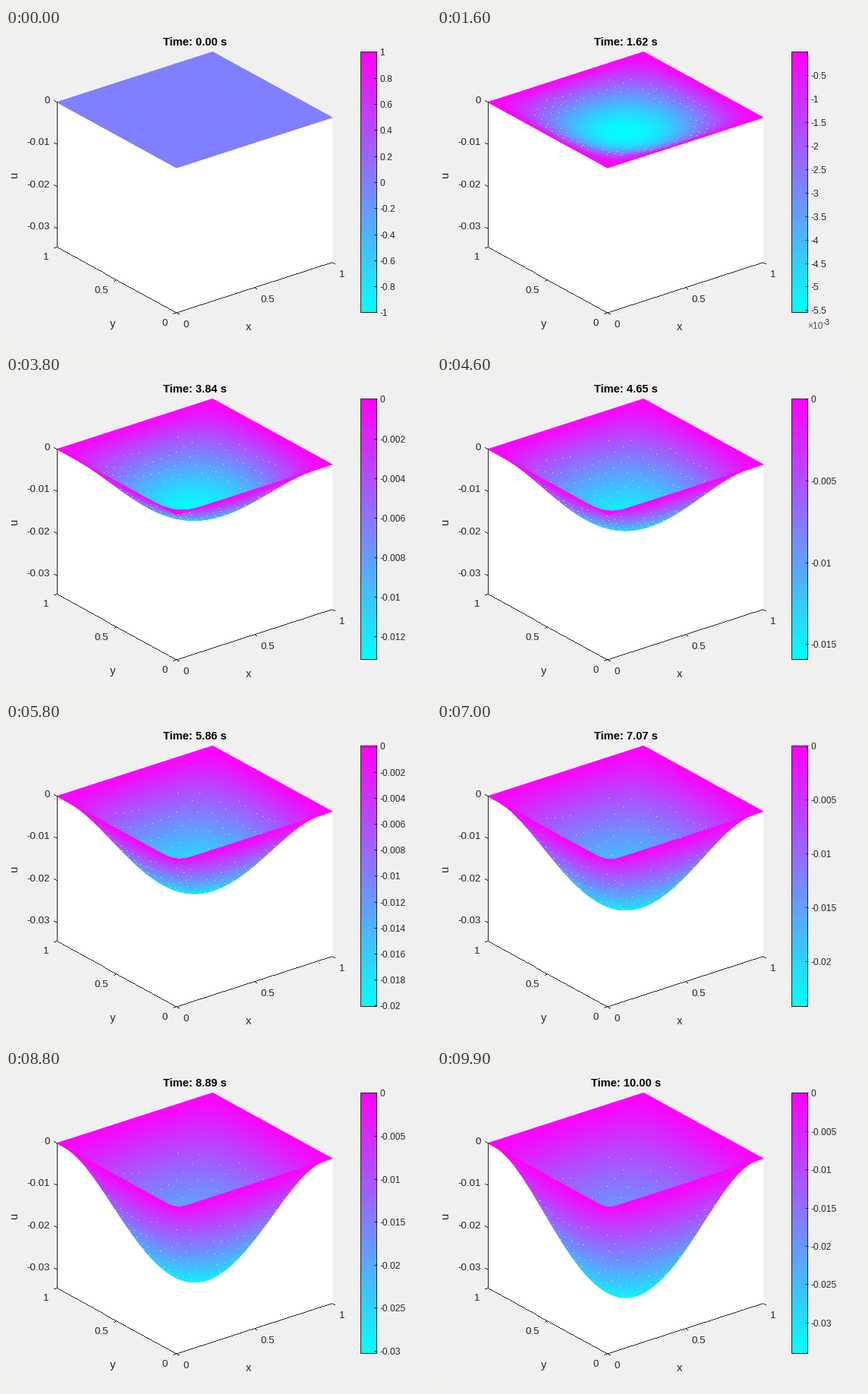
Write a matplotlib script that moves like this. It is 560 px wide and 420 px high and loops after 10 s.

```python
import numpy as np
import matplotlib.pyplot as plt
from matplotlib.animation import FuncAnimation
from matplotlib.patches import Polygon

W, H, DPI = 560, 420, 100
FRAMES, T_END = 100, 10.0
INK = "#262626"

plt.rcParams["font.family"] = "Liberation Sans"
fig = plt.figure(figsize=(W / DPI, H / DPI), dpi=DPI, facecolor="#f0f0f0")
ax = fig.add_axes([0, 0, 1, 1])
ax.set_xlim(-0.5, W - 0.5)
ax.set_ylim(H - 0.5, -0.5)
ax.axis("off")
ax.autoscale(False)

# Orthographic projection in pixels
ORIGIN = np.array([224.2, 183.5])
EX = np.array([205.0, -66.2])
EY = np.array([-157.5, -86.3])
DROP, Z_MIN = 191.0, 0.0344


def depth(t):
    """Largest deflection at time t."""
    return 0.003435 * t * (1 - 8.2e-5 * t * t)


def project(x, y, z=0.0):
    px = ORIGIN[0] + EX[0] * x + EY[0] * y
    py = ORIGIN[1] + EX[1] * x + EY[1] * y - DROP * z / Z_MIN
    return px, py


def text(x, y, s, px, **kw):
    opts = dict(ha="center", va="center_baseline", color=INK, zorder=6)
    opts.update(kw)
    return ax.text(x, y, s, fontsize=px * 72 / DPI, **opts)


# Hard-edged one-pixel lines live on a transparent layer
ink = np.zeros((H, W, 4), np.uint8)
ink[..., :3] = 0x26


def line(a, b):
    n = int(np.ceil(max(abs(b[0] - a[0]), abs(b[1] - a[1])))) + 1
    cols = np.rint(np.linspace(a[0], b[0], n)).astype(int)
    rows = np.rint(np.linspace(a[1], b[1], n)).astype(int)
    ink[rows, cols, 3] = 255


def tick(p, dx, dy):
    line(p, (p[0] + dx, p[1] + dy))


# Sagging membrane, fixed at its edges; far corner first for painter's order
N = 40
g = np.linspace(1, 0, N + 1)
X, Y = np.meshgrid(g, g)
shape = 16 * X * (1 - X) * Y * (1 - Y)

# Box and axes
box = [project(0, 1), project(1, 1), project(1, 0), project(1, 0, -Z_MIN),
       project(0, 0, -Z_MIN), project(0, 1, -Z_MIN)]
ax.add_patch(Polygon(box, fc="white", ec="none", antialiased=False, zorder=1))
for a, b in ((box[0], box[5]), (box[5], box[4]), (box[4], box[3])):
    line(a, b)

for k, v in enumerate((0, 0.5, 1)):
    tick(project(v, 0, -Z_MIN), 3.5, 2)
    tick(project(0, v, -Z_MIN), -3.8, 1.2)
    text(233 + 102.5 * k, 389.5 - 33 * k, f"{v:g}", 13.33, ha="left")
    text(212.7 - 78.2 * k, 387.5 - 43.5 * k, f"{v:g}", 13.33, ha="right")
for z in (0, -0.01, -0.02, -0.03):
    p = project(0, 1, z)
    tick(p, -3.5, -2)
    text(57, p[1] - 3.5, f"{z:g}", 13.33, ha="right")

text(319.3, 392.3, "x", 14.67)
text(140.3, 388.3, "y", 14.67)
text(11, 192, "u", 14.67, rotation=90, va="center")
title = text(248.7, 22.6, "", 14.67, weight="bold", color="black", va="baseline")

# Colour bar
L, R, TOP, BOT = 467, 488, 31, 374
ax.imshow(np.linspace(1, 0, 256)[:, None], cmap="cool", aspect="auto",
          extent=(L, R, BOT, TOP), zorder=2)
corners = [(L, TOP), (R, TOP), (R, BOT), (L, BOT)]
for a, b in zip(corners, corners[1:] + corners[:1]):
    line(a, b)
bar_labels = [text(492, 0, "", 12, ha="left") for _ in range(14)]
bar_ticks = [ax.plot([R - 4, R], [0, 0], color=INK, lw=0.72, zorder=5,
                     solid_capstyle="butt")[0] for _ in range(14)]
times10 = text(488, 391, "", 12, ha="left", color="#555555")
power = text(508.5, 386.5, "", 10, ha="left")

ax.imshow(ink, extent=(-0.5, W - 0.5, H - 0.5, -0.5), aspect="auto",
          interpolation="nearest", zorder=5)

# Speckles at mesh nodes
rng = np.random.default_rng(4)
node = np.zeros_like(shape, bool)
node[::2, ::2] = True
node &= rng.random(shape.shape) < 0.8
specks, = ax.plot([], [], ",", color="#ececf2", zorder=4)

state = {"mesh": None}


def tick_step(span):
    base = 10 ** np.floor(np.log10(span))
    r = span / base
    if 1.5 <= r < 1.6:
        return 0.5 * base
    return next(s for s in (0.1, 0.2, 0.5, 1) if r / s < 12) * base


def draw_bar(lo, hi):
    step = tick_step(hi - lo)
    vals = step * np.arange(np.ceil(lo / step - 1e-9), np.floor(hi / step + 1e-9) + 1)
    top = np.abs(vals).max()
    exp = int(np.floor(np.log10(top * (1 + 1e-9))))
    sci = exp < -2
    if sci:
        vals = vals[np.abs(vals) > step / 2]
    scale = 10.0 ** exp if sci else 1
    for k, (lab, tk) in enumerate(zip(bar_labels, bar_ticks)):
        on = k < len(vals)
        lab.set_visible(on)
        tk.set_visible(on)
        if on:
            y = BOT - (BOT - TOP) * (vals[k] - lo) / (hi - lo)
            lab.set_y(y + 0.5)
            lab.set_text(f"{round(vals[k] / scale, 6) + 0.0:g}")
            tk.set_ydata([y, y])
    times10.set_text("×10" if sci else "")
    power.set_text(str(exp) if sci else "")


def draw_specks(px, py, amp):
    """Show only nodes on the visible side of the front rim."""
    if amp == 0:
        specks.set_data([], [])
        return
    xr, xc = np.gradient(px)
    yr, yc = np.gradient(py)
    facing = xc * yr - yc * xr < 0
    rim = ORIGIN[1] + np.where(px < ORIGIN[0],
                               (px - ORIGIN[0]) * EY[1] / EY[0],
                               (px - ORIGIN[0]) * EX[1] / EX[0])
    limit = 0.5 + 0.45 * min(1, amp / 0.02)
    show = node & (shape > 0.3) & (shape < limit) & (facing == (py < rim))
    specks.set_data(px[show], py[show])


def update(i):
    t = T_END * i / (FRAMES - 1)
    amp = depth(t)
    u = -amp * shape
    lo, hi = (-amp, 0) if i else (-1, 1)
    px, py = project(X, Y, u)
    if state["mesh"] is not None:
        state["mesh"].remove()
    state["mesh"] = ax.pcolormesh(px, py, u, shading="gouraud", cmap="cool",
                                  vmin=lo, vmax=hi, zorder=3)
    draw_specks(px, py, amp)
    draw_bar(lo, hi)
    title.set_text(f"Time: {t:.2f} s")
    return []


anim = FuncAnimation(fig, update, frames=FRAMES, init_func=lambda: [],
                     interval=100, repeat=True, repeat_delay=0)
plt.show()
```
